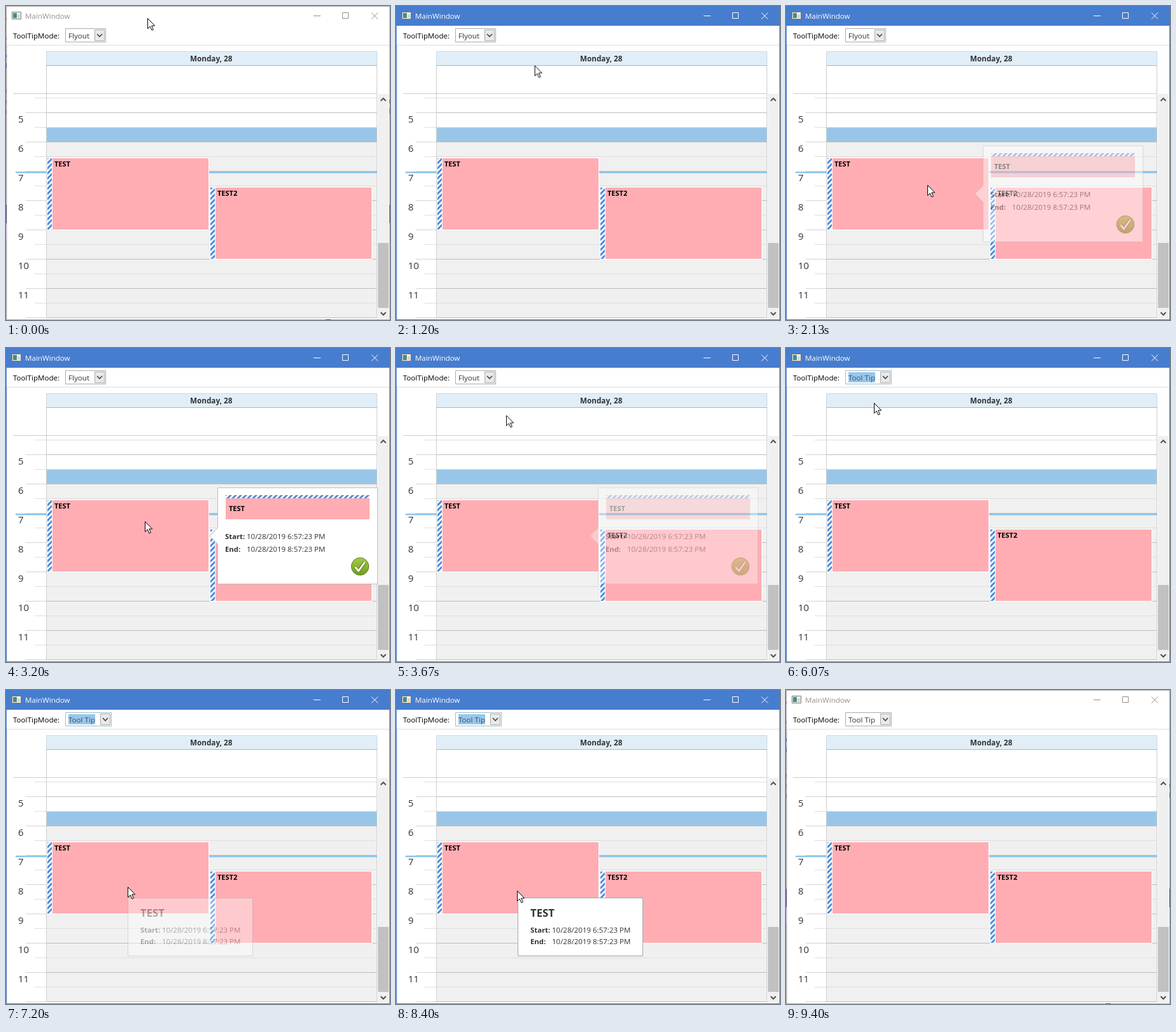
An HTML page that plays this animation: 603 px wide and 493 px high, repeating every 9540 ms.

```html
<!DOCTYPE html>
<html lang="en">
<head>
<meta charset="utf-8">
<title>MainWindow</title>
<style>
html, body { margin: 0; width: 100%; height: 100%; overflow: hidden; background: #fff; }
svg { display: block; width: 603px; height: 493px; }
text { font: 11.6px "Open Sans", "Noto Sans", sans-serif; fill: #333; white-space: pre; }
.bold { font-weight: 700; }
.small { font-size: 11px; font-weight: 700; fill: #000; }
.date { font-size: 11.5px; }
.key { font-size: 11.3px; font-weight: 700; }
.hour text { font-size: 15px; }
.line { fill: none; stroke-width: 1; }
.pick { fill: #99c6e8; }
.picked { fill: #2f5577; }

/* one loop is 9540 ms; hard switches use step-end */
.on { visibility: hidden; animation: 9540ms step-end infinite; }
.active { animation-name: active; }
.inactive { visibility: visible; animation-name: inactive; }
.idle { visibility: visible; animation-name: idle; }
.hover { animation-name: hover; }
.plain { animation-name: plain; }
.marked { animation-name: marked; }
.chosen { animation-name: chosen; }
.focus { animation-name: focus; }
.blur { animation-name: blur; }
.row-flyout { animation-name: row-flyout; }
.row-none { animation-name: row-none; }
.row-tip { animation-name: row-tip; }
.row-set { animation-name: row-set; }
.menu, .flyout, .tip, .cursor { animation: 9540ms linear infinite; }
.menu { opacity: 0; animation-name: menu; }
.flyout { opacity: 0; animation-name: flyout; }
.tip { opacity: 0; animation-name: tip; }
.cursor { animation-name: cursor; }

@keyframes active { 0% { visibility: hidden } 8.386% { visibility: visible } 98.532%, 100% { visibility: hidden } }
@keyframes inactive { 0% { visibility: visible } 8.386% { visibility: hidden } 98.532%, 100% { visibility: visible } }
@keyframes idle { 0% { visibility: visible } 40.881%, 100% { visibility: hidden } }
@keyframes hover { 0% { visibility: hidden } 40.881% { visibility: visible } 63.627%, 100% { visibility: hidden } }
@keyframes plain { 0% { visibility: hidden } 40.881% { visibility: visible } 48.952%, 100% { visibility: hidden } }
@keyframes marked { 0% { visibility: hidden } 48.952% { visibility: visible } 62.159%, 100% { visibility: hidden } }
@keyframes chosen { 0% { visibility: hidden } 62.159% { visibility: visible } 63.627%, 100% { visibility: hidden } }
@keyframes focus { 0% { visibility: hidden } 63.627% { visibility: visible } 98.532%, 100% { visibility: hidden } }
@keyframes blur { 0% { visibility: hidden } 98.532%, 100% { visibility: visible } }
@keyframes row-flyout { 0% { visibility: hidden } 48.952% { visibility: visible } 53.774%, 100% { visibility: hidden } }
@keyframes row-none { 0% { visibility: hidden } 53.774% { visibility: visible } 55.87%, 100% { visibility: hidden } }
@keyframes row-tip { 0% { visibility: hidden } 55.87% { visibility: visible } 62.159%, 100% { visibility: hidden } }
@keyframes row-set { 0% { visibility: hidden } 62.159% { visibility: visible } 63.627%, 100% { visibility: hidden } }

@keyframes menu {
  0%, 48.95% { opacity: 0 }
  48.952% { opacity: .5 }
  49.57%, 63.62% { opacity: 1 }
  63.627%, 100% { opacity: 0 }
}
@keyframes flyout {
  0%, 22.32% { opacity: 0; transform: translateX(-23px) }
  22.327%, 22.6% { opacity: .45; transform: translateX(-23px); animation-timing-function: ease-out }
  27.25%, 35.64% { opacity: 1; transform: none; animation-timing-function: ease-in }
  39.31%, 100% { opacity: 0; transform: translateX(-23px) }
}
@keyframes tip {
  0%, 75.46% { opacity: 0 }
  75.472% { opacity: .35 }
  76.834%, 89.41% { opacity: 1 }
  90.78%, 100% { opacity: 0 }
}
@keyframes cursor {
  0%, .7% { transform: translate(222px, 19px) }
  1.5% { transform: translate(223px, 26px) }
  4.2% { transform: translate(215px, 55px) }
  5.556%, 10.6% { transform: translate(219px, 37px) }
  14.6% { transform: translate(216px, 150px); animation-timing-function: ease-out }
  18.868%, 32.85% { transform: translate(222px, 281px) }
  33.54%, 34.2% { transform: translate(218px, 272px) }
  37.736% { transform: translate(185px, 130px) }
  40.566% { transform: translate(139px, 37px) }
  41.929%, 43.9% { transform: translate(146px, 43px) }
  45.388%, 53.1% { transform: translate(146px, 45px) }
  57.5% { transform: translate(143px, 94px) }
  60.063%, 65.8% { transform: translate(138px, 86px); animation-timing-function: ease-in-out }
  72.642%, 87.95% { transform: translate(191px, 309px) }
  88.05%, 88.7% { transform: translate(190px, 315px) }
  92.977%, 100% { transform: translate(54px, 494px) }
}
</style>
</head>
<body>
<svg viewBox="0 0 603 493">
  <defs>
    <pattern id="stripes" width="8" height="8" patternUnits="userSpaceOnUse">
      <path fill="#fff" d="M0 0h8v8H0z"/>
      <path stroke="#4a8cdc" stroke-width="3" d="M-2 2l4-4M-1 9L9-1M6 10l4-4"/>
    </pattern>
    <linearGradient id="green" x2="0" y2="1">
      <stop stop-color="#a5cb4a"/><stop offset="1" stop-color="#6f9e1c"/>
    </linearGradient>
    <clipPath id="field"><path d="M94 36h45v20H94z"/></clipPath>
    <path id="chevron" fill="none" stroke-width="1.6" d="M-4-2L0 2l4-4"/>
    <g id="buttons" class="line">
      <path d="M483 15.5h11M528.5 10.5h9v9h-9zM574 10.5l10 10M584 10.5l-10 10"/>
    </g>
    <g id="arrow">
      <path class="line" fill="#e9e9e9" d="M139.5 37.5h15v17h-15z" style="fill:#e9e9e9"/>
      <use href="#chevron" x="147" y="46" stroke="#444"/>
    </g>
    <g id="times">
      <text class="key">Start:</text>
      <text class="date" x="34">10/28/2019 6:57:23 PM</text>
    </g>
    <g id="ends">
      <text class="key">End:</text>
      <text class="date" x="34">10/28/2019 8:57:23 PM</text>
    </g>
  </defs>

  <path fill="#fff" d="M0 0h603v493H0z"/>

  <!-- title bar -->
  <g class="on inactive">
    <path class="line" stroke="#a9a9a9" d="M.5.5h602v492H.5z"/>
    <g fill="#9c6b78">
      <path d="M0 18h1v4H0zM0 49h1v4H0zM0 131h1v6H0zM0 148h1v5H0zM0 163h1v6H0z"/>
      <path fill="#5a5ab8" d="M0 76h1v5H0zM0 90h1v8H0zM602 147h1v6h-1zM602 161h1v8h-1z"/>
      <path fill="#4c3d82" d="M0 312h1v29H0zM602 312h1v29h-1zM502 492h8v1h-8z"/>
      <path fill="#c9b5e0" d="M0 341h1v25H0z"/>
    </g>
    <text x="30" y="20" style="fill:#929292">MainWindow</text>
    <use href="#buttons" stroke="#8f8f8f"/>
  </g>
  <g class="on active">
    <path class="line" stroke="#477dce" d="M.5.5h602v492H.5z"/>
    <path fill="#477dce" d="M0 0h603v31H0z"/>
    <text x="30" y="20" style="fill:#fff">MainWindow</text>
    <use href="#buttons" stroke="#fff"/>
  </g>
  <path fill="#f5f5f5" stroke="#777" d="M9.5 9.5h14v11h-14z"/>
  <path fill="#3f8f86" d="M11 11h6v8h-6z"/>
  <path fill="#cfd6da" d="M18 13h4v6h-4z"/>

  <!-- toolbar -->
  <text x="11" y="51" style="fill:#000">ToolTipMode:</text>
  <g class="on idle">
    <path class="line" stroke="#ababab" d="M93.5 35.5h63v21h-63z"/>
    <use href="#arrow" stroke="#ababab"/>
    <text x="98" y="51">Flyout</text>
  </g>
  <g class="on hover">
    <path class="line" stroke="#a5b8c8" d="M93.5 35.5h63v21h-63z"/>
    <path fill="#d9eaf7" stroke="#6faedb" d="M139.5 37.5h15v17h-15z"/>
    <use href="#chevron" x="147" y="46" stroke="#444"/>
  </g>
  <text class="on plain" x="98" y="51">Flyout</text>
  <g class="on marked">
    <path class="pick" d="M98 38h33v16H98z"/>
    <text class="picked" x="98" y="51">Flyout</text>
  </g>
  <g class="on chosen" clip-path="url(#field)">
    <path class="pick" d="M98 38h42v16H98z"/>
    <text class="picked" x="98" y="51">Tool Tip</text>
  </g>
  <g class="on focus">
    <path class="line" stroke="#9fbbd2" d="M93.5 35.5h72v21h-72z"/>
    <use href="#arrow" x="9" stroke="#ababab"/>
    <path class="pick" d="M98 38h42v16H98z"/>
    <text class="picked" x="98" y="51">Tool Tip</text>
  </g>
  <g class="on blur">
    <path class="line" stroke="#ababab" d="M93.5 35.5h72v21h-72z"/>
    <use href="#arrow" x="9" stroke="#ababab"/>
    <text x="98" y="51">Tool Tip</text>
  </g>

  <!-- calendar -->
  <path class="line" stroke="#dcdcdc" d="M1 61.5h601M1.5 61v431"/>
  <path fill="#f0f0f0" d="M64 214h519v276H64z"/>
  <path fill="#e1eef8" stroke="#cbd8e2" d="M63.5 71.5h519v22h-519z"/>
  <path class="line" stroke="#b4b4b4" d="M63 93.5h520"/>
  <path class="line" stroke="#cdcdcd" d="M11 137.5h572"/>
  <text class="bold" x="289" y="87" style="font-size:11.7px">Monday, 28</text>
  <path class="line" stroke="#dfdfdf" d="M45 144.5h538m-538 46h538m-538 46h538m-538 46h538m-538 46h538m-538 46h538m-538 46h538m-538 46h538"/>
  <path class="line" stroke="#bdbdbd" d="M64 167.5h519m-519 46h519m-519 46h519m-519 46h519m-519 46h519m-519 46h519m-519 46h519m-519 46h519"/>
  <path class="line" stroke="#d4d4d4" d="M31 167.5h32m-32 46h32m-32 46h32m-32 46h32m-32 46h32m-32 46h32m-32 46h32m-32 46h32"/>
  <path class="pick" d="M64 191h519v22H64z"/>
  <path class="line" stroke="#cdcdcd" d="M63.5 94v396M582.5 94v396"/>
  <path fill="#8cc4ea" d="M15 260h568v2.5H15z"/>
  <g class="hour">
    <text x="19" y="183">5</text>
    <text x="19" y="229">6</text>
    <text x="19" y="275">7</text>
    <text x="19" y="321">8</text>
    <text x="19" y="367">9</text>
    <text x="19" y="413">10</text>
    <text x="19" y="459">11</text>
  </g>

  <!-- appointments -->
  <path fill="#fff" d="M64 238h255v114H64zM320 284h255v114H320z"/>
  <path fill="#ffadb3" d="M73 239h245v112H73zM329 285h245v112H329z"/>
  <path fill="url(#stripes)" d="M65 239h7v112h-7zM321 285h7v112h-7z"/>
  <text class="small" x="76" y="252">TEST</text>
  <text class="small" x="332" y="298">TEST2</text>

  <!-- scroll bar -->
  <path fill="#f0f0f0" d="M584 138h17v353h-17z"/>
  <path fill="#c1c1c1" d="M584 372h17v102h-17z"/>
  <g fill="none" stroke="#505050" stroke-width="2">
    <path d="M588.5 149l4-4 4 4M588.5 481l4 4 4-4"/>
  </g>

  <g class="flyout">
    <path fill="#fff" stroke="#bcbcbc" d="M332.5 219.5h251v151h-251V308l-13-13 13-13z"/>
    <path fill="url(#stripes)" d="M345 231h226v5H345z"/>
    <path fill="#ffadb3" d="M345 236h226v33H345z"/>
    <text class="small" x="350" y="256">TEST</text>
    <use href="#times" x="344" y="300"/>
    <use href="#ends" x="344" y="320"/>
    <circle cx="556" cy="343" r="13.7" fill="url(#green)" stroke="#5c7f1d"/>
    <path d="M548.5 344l5 6 10-14" fill="none" stroke="#587a18" stroke-width="5"/>
    <path d="M548.5 344l5 6 10-14" fill="none" stroke="#fff" stroke-width="3"/>
  </g>

  <g class="menu">
    <path fill="#000" opacity=".1" d="M95 59h64v64H95z"/>
    <path fill="#fff" stroke="#9a9a9a" d="M93.5 57.5h63v63h-63z"/>
    <path class="on row-flyout" fill="#bedaed" d="M95 99h60v20H95z"/>
    <path class="on row-none" fill="#d9eaf6" d="M95 59h60v20H95z"/>
    <path class="on row-tip" fill="#d9eaf6" d="M95 79h60v20H95z"/>
    <path class="on row-set" fill="#bedaed" d="M95 79h60v20H95z"/>
    <text x="98" y="74">None</text>
    <text x="98" y="94">Tool Tip</text>
    <text x="98" y="114">Flyout</text>
  </g>

  <g class="tip">
    <path fill="#fff" stroke="#a6a6a6" d="M191.5 326.5h196v91h-196z"/>
    <text class="bold" x="211" y="356" style="font-size:16.7px">TEST</text>
    <use href="#times" x="211" y="381"/>
    <use href="#ends" x="211" y="399"/>
  </g>

  <path class="cursor" fill="#fff" stroke="#000" d="M.5.5v16l3.7-3.5 2.8 6 2.4-1.1-2.7-5.9h5z"/>
</svg>
</body>
</html>
```
